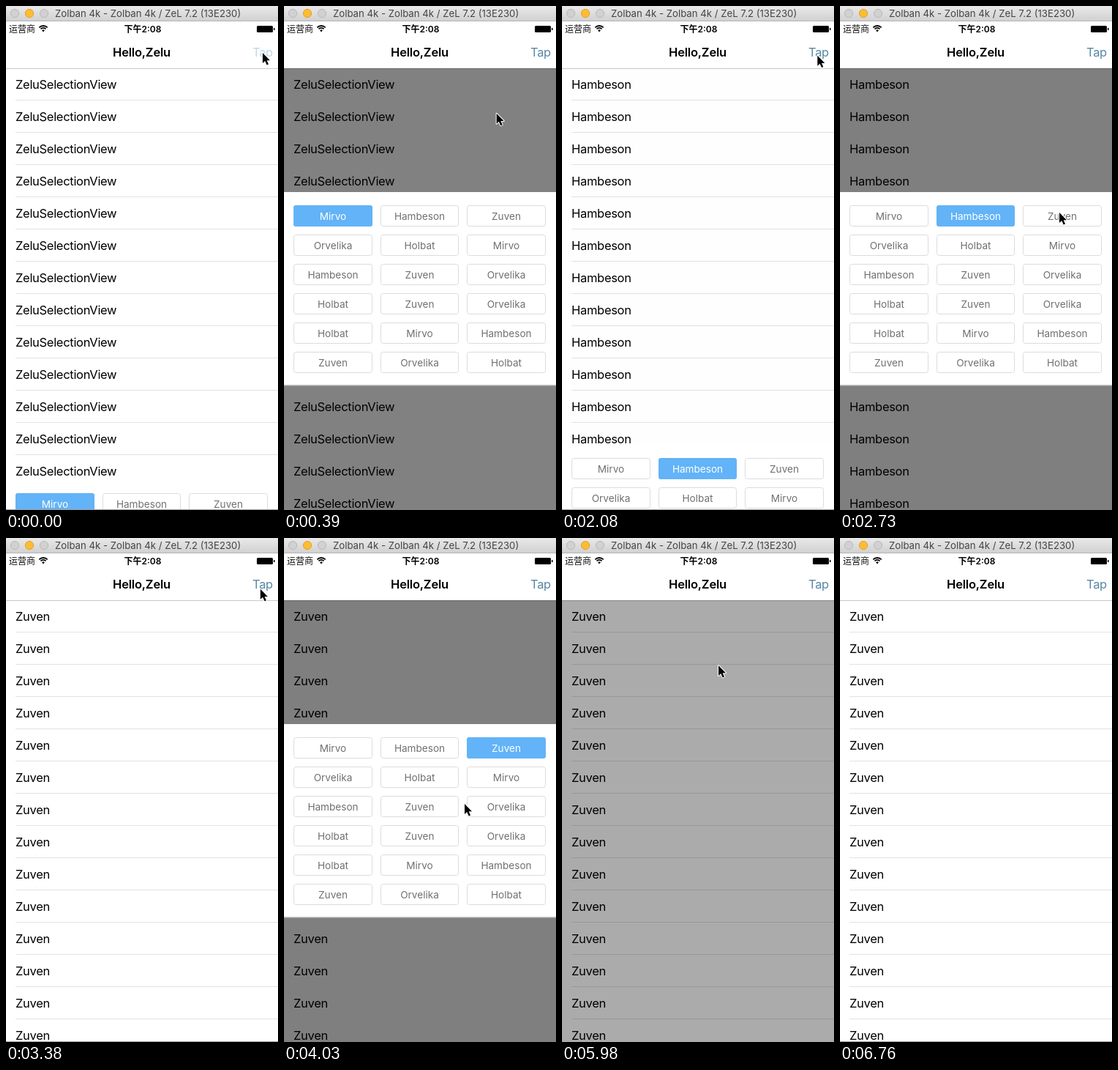
Recreate the animation shown at these times as an HTML page with a canvas. Size 372 by 688 pixels, loop 7.28 s.

```html
<!DOCTYPE html>
<html lang="zh">
<head>
<meta charset="utf-8">
<title>Selection view</title>
<style>
  html, body { margin: 0; width: 100%; height: 100%; overflow: hidden; background: #fff; }
  canvas { display: block; width: 372px; height: 688px; }
</style>
</head>
<body>
<canvas id="stage"></canvas>
<script>
const W = 372, H = 688, LOOP = 7280, STEP = 130;
const canvas = document.getElementById('stage');
const ctx = canvas.getContext('2d');
const dpr = window.devicePixelRatio || 1;
canvas.width = W * dpr;
canvas.height = H * dpr;

const UI = 'Inter, "Noto Sans CJK SC", "Noto Sans CJK", sans-serif';
const OPTIONS = [
  'Mirvo', 'Hambeson', 'Zuven',
  'Orvelika', 'Holbat', 'Mirvo',
  'Hambeson', 'Zuven', 'Orvelika',
  'Holbat', 'Zuven', 'Orvelika',
  'Holbat', 'Mirvo', 'Hambeson',
  'Zuven', 'Orvelika', 'Holbat'
];
const COLUMNS = [[13, 108], [132, 107], [250, 108]];
const PANEL_TOP = 254, PANEL_HEIGHT = 263;
const PICKS = [880, 2900];

// The dimming starts a little after the panel in both directions.
const SESSIONS = [
  { open: -80, close: 880, slide: 400, fade: 975 },
  { open: 1960, close: 2900, slide: 400, fade: 2995 },
  { open: 3500, close: 4430, slide: 400, fade: 4525 },
  { open: 5200, close: 5680, slide: 300, fade: 5822 }
];

// Cursor stops: time, x, y
const PATH = [
  [0, 351, 64], [130, 351, 64], [750, 190, 285], [880, 190, 285],
  [1170, 248, 226], [1800, 350, 65], [2040, 350, 65],
  [2600, 300, 282], [2900, 300, 282], [3430, 349, 65], [3570, 349, 65],
  [4030, 247, 363], [4330, 226, 570], [4470, 226, 570],
  [5130, 347, 66], [5260, 347, 66], [5640, 214, 174], [5990, 214, 174],
  [6500, 390, -25]
];

const clamp = v => Math.max(0, Math.min(1, v));
const ease = v => (1 - Math.cos(Math.PI * clamp(v))) / 2;
const ramp = (t, start, span) => ease((t - start) / span);

function text(str, x, y, size, color, opt = {}) {
  ctx.font = `${opt.weight || 400} ${size}px ${UI}`;
  ctx.letterSpacing = (opt.spacing || 0) + 'px';
  ctx.textAlign = opt.align || 'left';
  ctx.fillStyle = color;
  ctx.fillText(str, x, y);
}

function rect(x, y, w, h, color) {
  ctx.fillStyle = color;
  ctx.fillRect(x, y, w, h);
}

function box(x, y, w, h, r) {
  ctx.beginPath();
  ctx.roundRect(x, y, w, h, r);
}

function drawWindowBar() {
  const shade = ctx.createLinearGradient(0, 0, 0, 20);
  shade.addColorStop(0, '#e9e9e9');
  shade.addColorStop(1, '#d1d1d1');
  rect(0, 0, W, 20, shade);
  rect(0, 20, W, 1, '#b5b5b5');
  [['#d1d1d1', '#b9b9b9'], ['#fdbd30', '#e0a02d'], ['#d1d1d1', '#b9b9b9']].forEach(([fill, edge], i) => {
    ctx.beginPath();
    ctx.arc(12 + 20 * i, 10, 5.6, 0, Math.PI * 2);
    ctx.fillStyle = fill;
    ctx.fill();
    ctx.strokeStyle = edge;
    ctx.lineWidth = 1;
    ctx.stroke();
  });
  text('Zolban 4k - Zolban 4k / ZeL 7.2 (13E230)', 67, 15, 13.2, '#444');
}

function drawStatus() {
  text('运营商', 4, 35.5, 12, '#111');
  text('下午2:08', 187, 35.5, 12, '#000', { align: 'center', weight: 600 });
  ctx.strokeStyle = ctx.fillStyle = '#000';
  ctx.lineWidth = 1.8;
  for (const r of [8, 5]) {
    ctx.beginPath();
    ctx.arc(51, 35, r, -Math.PI * 0.75, -Math.PI * 0.25);
    ctx.stroke();
  }
  ctx.beginPath();
  ctx.moveTo(51, 35.5);
  ctx.arc(51, 35, 2.6, -Math.PI * 0.75, -Math.PI * 0.25);
  ctx.fill();
  box(343, 27, 22, 9, 1.5);
  ctx.fill();
  ctx.fillRect(366, 30, 1.5, 3);
}

function drawNav(t) {
  rect(0, 21, W, 64, '#fff');
  drawStatus();
  text('Hello,Zelu', 185.5, 69, 16.5, '#000', { align: 'center', weight: 600, spacing: -0.2 });
  const pressed = t < 130 || [1900, 3450, 5150].some(p => t >= p && t < p + 150);
  text('Tap', 337, 69, 16.5, pressed ? '#bcd8ec' : '#5587a3', { spacing: -0.3 });
}

function drawList(label, dim) {
  rect(0, 85, W, H - 85, '#fff');
  for (let i = 0; i < 14; i++) {
    const y = 106.5 + 44 * i;
    text(label, 13, y + 6, 16.5, '#000', { spacing: -0.3 });
    if (dim < 0.49) rect(13, y + 21.5, W - 13, 1, '#e2e2e2');
  }
  rect(0, 85, W, 1, '#c8c8c8');
  if (dim > 0) rect(0, 85, W, H - 85, `rgba(0,0,0,${dim})`);
}

function drawPanel(top, selected) {
  rect(0, top + PANEL_HEIGHT, W, 1.5, '#c2c2c2');
  rect(0, top, W, PANEL_HEIGHT, '#fff');
  OPTIONS.forEach((name, i) => {
    const [x, w] = COLUMNS[i % 3];
    const y = top + 18 + 40 * Math.floor(i / 3);
    const on = i === selected;
    if (on) {
      box(x, y, w, 29, 3);
      ctx.fillStyle = '#62b3f7';
      ctx.fill();
    } else {
      box(x + 0.5, y + 0.5, w - 1, 28, 3);
      ctx.strokeStyle = '#dcdcdc';
      ctx.lineWidth = 1;
      ctx.stroke();
    }
    text(name, x + w / 2, y + 19.5, 13.6, on ? '#fff' : '#707070', { align: 'center' });
  });
}

function drawCursor(t) {
  const next = PATH.findIndex(p => p[0] > t);
  if (next < 1) return;
  const [t0, x0, y0] = PATH[next - 1], [t1, x1, y1] = PATH[next];
  const k = ramp(t, t0, t1 - t0);
  ctx.save();
  ctx.translate(x0 + (x1 - x0) * k, y0 + (y1 - y0) * k);
  const arrow = new Path2D('M0 0V14L3.2 11L5.7 16.4L8 15.4L5.7 10.2H10Z');
  ctx.lineJoin = 'round';
  ctx.lineWidth = 2;
  ctx.strokeStyle = '#fff';
  ctx.stroke(arrow);
  ctx.fillStyle = '#000';
  ctx.fill(arrow);
  ctx.restore();
}

function draw(t) {
  let shown = 0, dim = 0;
  for (const s of SESSIONS) {
    shown += ramp(t, s.open, 400) - ramp(t, s.close, s.slide);
    dim += 0.5 * (ramp(t, s.open + 100, 400) - ramp(t, s.fade, 400));
  }
  const selected = PICKS.filter(p => t >= p).length;
  const label = selected ? OPTIONS[selected] : 'ZeluSelectionView';

  ctx.setTransform(dpr, 0, 0, dpr, 0, 0);
  drawList(label, dim);
  if (shown > 0.001) drawPanel(Math.round(PANEL_TOP + (H - PANEL_TOP) * (1 - shown)), selected);
  drawNav(t);
  drawWindowBar();
  if (dim < 0.3) rect(0, H - 1, W, 1, '#9c9c9c');
  drawCursor(t);
}

const start = performance.now();
function tick() {
  const t = (performance.now() - start) % LOOP;
  draw(Math.floor(t / STEP) * STEP);
  requestAnimationFrame(tick);
}
tick();
</script>
</body>
</html>
```
